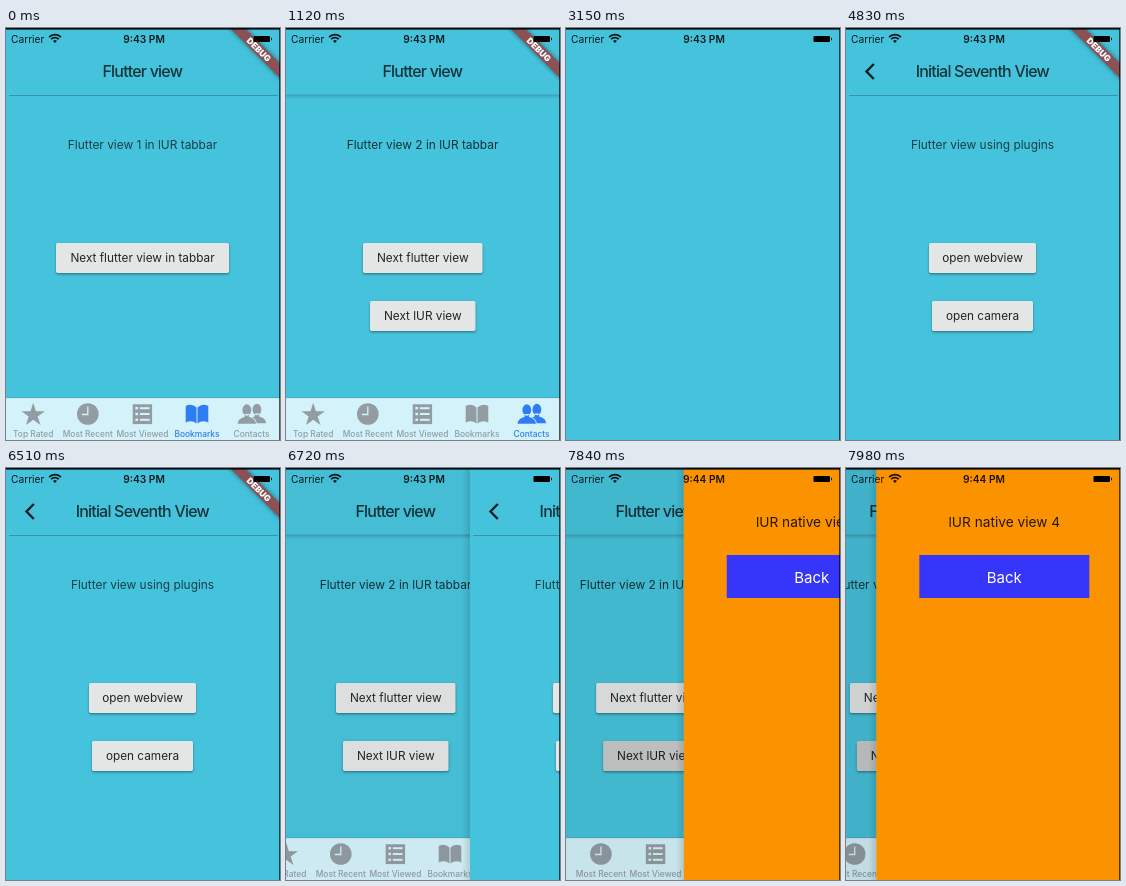
An HTML page with a canvas for the animation above (8 s loop, 274 by 412 pixels).

```html
<!DOCTYPE html>
<html lang="en">
<head>
<meta charset="utf-8">
<title>Tab bar navigation</title>
<style>
html, body { margin: 0; width: 100%; height: 100%; overflow: hidden; background: #46c3dc; }
canvas { display: block; width: 274px; height: 412px; }
</style>
</head>
<body>
<canvas id="stage"></canvas>
<script>
const W = 274, H = 412, LOOP = 8000, STEP = 70;
const CYAN = '#46c3dc', GREY = '#929ca2', BLUE = '#2f7df5', BAR = '#d4f2fa';
const canvas = document.getElementById('stage');
const ctx = canvas.getContext('2d');
const dpr = window.devicePixelRatio || 1;
canvas.width = W * dpr;
canvas.height = H * dpr;

const clamp = v => Math.max(0, Math.min(1, v));

// Critically damped spring used by the navigation controller.
function spring(t, start, length = 530) {
  const x = (t - start) * 0.0132;
  if (x <= 0) return 0;
  return t - start >= length ? 1 : 1 - (1 + x) * Math.exp(-x);
}

function rect(x, y, w, h, color) {
  ctx.fillStyle = color;
  ctx.fillRect(x, y, w, h);
}

function disc(x, y, r, color) {
  ctx.fillStyle = color;
  ctx.beginPath();
  ctx.arc(x, y, r, 0, Math.PI * 2);
  ctx.fill();
}

function line(points, width, color, cap = 'butt') {
  ctx.strokeStyle = color;
  ctx.lineWidth = width;
  ctx.lineCap = cap;
  ctx.beginPath();
  points.forEach(([x, y], i) => i ? ctx.lineTo(x, y) : ctx.moveTo(x, y));
  ctx.stroke();
}

function text(str, x, y, size, color, { weight = 400, align = 'center', spacing = 0 } = {}) {
  ctx.font = `${weight} ${size}px Inter, "Open Sans", sans-serif`;
  ctx.letterSpacing = spacing + 'px';
  ctx.textAlign = align;
  ctx.fillStyle = color;
  ctx.fillText(str, x, y);
  ctx.letterSpacing = '0px';
}

function at(x, y, draw) {
  ctx.save();
  ctx.translate(x, y);
  draw();
  ctx.restore();
}

function button(label, x, y, w, press = 0) {
  const h = 30;
  ctx.save();
  ctx.shadowColor = 'rgba(0,0,0,.4)';
  ctx.shadowBlur = 2.5 * dpr;
  ctx.shadowOffsetY = 1.2 * dpr;
  ctx.fillStyle = '#e4e6e6';
  ctx.beginPath();
  ctx.roundRect(x, y, w, h, 1.7);
  ctx.fill();
  ctx.restore();
  if (press > 0) {
    ctx.save();
    ctx.beginPath();
    ctx.roundRect(x, y, w, h, 1.7);
    ctx.clip();
    rect(x, y, w, h, 'rgba(0,0,0,.05)');
    disc(x + w / 2, y + h / 2, 8 + press * w * 0.55, 'rgba(0,0,0,.07)');
    ctx.restore();
  }
  text(label, x + w / 2, y + 19, 11.8, 'rgba(0,0,0,.85)');
}

function banner() {
  at(W - 0.5, 1, () => {
    ctx.rotate(Math.PI / 4);
    ctx.shadowColor = 'rgba(0,0,0,.5)';
    ctx.shadowBlur = 5 * dpr;
    rect(-36, 24, 72, 10.3, '#8c5157');
    ctx.shadowColor = 'transparent';
    text('DEBUG', 0, 32.3, 8.6, '#fff', { weight: 900 });
  });
}

function header(title, soft) {
  text(title, 136.3, 49, 16, 'rgba(0,0,0,.74)', { weight: 500, spacing: -0.8 });
  if (soft) {
    const g = ctx.createLinearGradient(0, 66, 0, 71);
    g.addColorStop(0, 'rgba(0,0,0,.2)');
    g.addColorStop(1, 'rgba(0,0,0,0)');
    rect(0, 66.5, W, 4.5, g);
  } else {
    rect(3, 67, 269, 1, 'rgba(0,0,0,.24)');
  }
}

const body = (str, dark) => text(str, 136.5, 121, 11.9, `rgba(0,0,0,${dark})`);

const icons = [
  c => {
    ctx.fillStyle = c;
    ctx.beginPath();
    for (let i = 0; i < 10; i++) {
      const r = i % 2 ? 4.7 : 12.3, a = i * Math.PI / 5 - Math.PI / 2;
      ctx.lineTo(r * Math.cos(a), 1 + r * Math.sin(a));
    }
    ctx.fill();
  },
  c => {
    disc(0, 0, 10.8, c);
    line([[0, -7.5], [0, 0.5], [-6, 0.5]], 1.3, BAR);
  },
  c => {
    rect(-9.7, -9.7, 19.4, 19.8, c);
    for (const y of [-5.8, 0, 5.8]) {
      rect(-7, y - 1.2, 2.6, 2.4, BAR);
      rect(-2.6, y - 1, 9.8, 2, BAR);
    }
  },
  c => {
    ctx.fillStyle = c;
    for (const s of [-1, 1]) {
      ctx.beginPath();
      ctx.moveTo(s * 0.5, -6.5);
      ctx.quadraticCurveTo(s * 5, -11, s * 11.3, -8);
      ctx.lineTo(s * 11.3, 8.5);
      ctx.quadraticCurveTo(s * 5, 5.8, s * 0.5, 9.5);
      ctx.fill();
    }
  },
  c => {
    person(5.3, -0.5, c);
    person(-4.8, 0, c);
  }
];

function person(x, y, c) {
  at(x, y, () => {
    ctx.beginPath();
    ctx.ellipse(0, -4, 4.4, 5.8, 0, 0, Math.PI * 2);
    ctx.moveTo(-2.2, 0);
    ctx.lineTo(-2.2, 3);
    ctx.quadraticCurveTo(-9, 4.6, -9.2, 9.8);
    ctx.lineTo(9.2, 9.8);
    ctx.quadraticCurveTo(9, 4.6, 2.2, 3);
    ctx.lineTo(2.2, 0);
    ctx.closePath();
    ctx.strokeStyle = BAR;
    ctx.lineWidth = 1.6;
    ctx.stroke();
    ctx.fillStyle = c;
    ctx.fill();
  });
}

const TABS = ['Top Rated', 'Most Recent', 'Most Viewed', 'Bookmarks', 'Contacts'];

function tabBar(selected) {
  rect(0, 370, W, 42, BAR);
  rect(0, 369.6, W, 0.6, 'rgba(0,0,0,.22)');
  TABS.forEach((label, i) => {
    const x = 27.2 + i * 54.6, c = i === selected ? BLUE : GREY;
    at(x, 386, () => icons[i](c));
    text(label, x, 409, 8.4, c, { weight: 500 });
  });
}

function firstTab() {
  rect(0, 0, W, H, CYAN);
  header('Flutter view', false);
  body('Flutter view 1 in lUR tabbar', 0.68);
  button('Next flutter view in tabbar', 50, 215, 173);
  banner();
  tabBar(3);
}

function secondTab(t) {
  rect(0, 0, W, H, CYAN);
  ctx.globalAlpha = clamp((t - 630) / 280);
  if (ctx.globalAlpha > 0) {
    header('Flutter view', true);
    body('Flutter view 2 in lUR tabbar', 0.75);
    const tap = start => t < start + 700 ? clamp((t - start + 70) / 350) : 0;
    button('Next flutter view', 77, 215, 119.5, tap(2380));
    button('Next lUR view', 84, 273, 105.5, tap(7350));
    banner();
  }
  ctx.globalAlpha = 1;
  tabBar(4);
}

function edgeShadow() {
  const g = ctx.createLinearGradient(-8, 0, 0, 0);
  g.addColorStop(0, 'rgba(0,0,0,0)');
  g.addColorStop(1, 'rgba(0,0,0,.12)');
  rect(-8, 0, 8, H, g);
}

function pluginView(t) {
  rect(0, 0, W, H, CYAN);
  const p = spring(t, 3640, 700);
  if (p === 0) return;
  at((1 - p) * W, 0, () => {
    if (p < 1) edgeShadow();
    line([[27.8, 36], [20.5, 43.5], [27.8, 51]], 2.4, 'rgba(0,0,0,.85)');
    header('Initial Seventh View', false);
    body('Flutter view using plugins', 0.68);
    button('open webview', 83, 215, 107);
    button('open camera', 86, 273, 101);
  });
  banner();
}

function nativeView() {
  rect(0, 0, W, H, '#fb9300');
  text('lUR native view 4', 128, 59, 13.7, 'rgba(0,0,0,.85)');
  rect(43, 87, 170, 43, '#3636fa');
  text('Back', 128, 114.5, 15, '#fff');
}

// Slides one view over another; the lower one lags and dims.
function stack(p, lower, upper) {
  if (p < 1) {
    at(-p * W * 0.3, 0, lower);
    rect(0, 0, W, H, `rgba(0,0,0,${0.1 * p})`);
  }
  if (p > 0) at((1 - p) * W, 0, () => {
    if (p < 1) edgeShadow();
    upper();
  });
}

function statusBar(t) {
  const ink = 'rgba(0,0,0,.88)';
  text('Carrier', 5, 14.5, 10.2, ink, { align: 'left' });
  for (const r of [8.2, 5.2]) {
    ctx.strokeStyle = ink;
    ctx.lineWidth = 1.7;
    ctx.beginPath();
    ctx.arc(49, 14.8, r, -Math.PI * 0.76, -Math.PI * 0.24);
    ctx.stroke();
  }
  ctx.fillStyle = ink;
  ctx.beginPath();
  ctx.moveTo(49, 15);
  ctx.arc(49, 14.8, 2.7, -Math.PI * 0.76, -Math.PI * 0.24);
  ctx.fill();
  text(t < 7350 ? '9:43 PM' : '9:44 PM', 138, 14.5, 10.2, ink, { weight: 600 });
  ctx.fillStyle = '#000';
  ctx.beginPath();
  ctx.roundRect(247.5, 8, 16.5, 6, 1);
  ctx.fill();
  rect(265, 9.8, 1, 2.4, ink);
}

function draw(t) {
  ctx.setTransform(dpr, 0, 0, dpr, 0, 0);
  const tab = () => secondTab(t);
  if (t < 70) firstTab();
  else if (t < 7200) {
    stack(spring(t, 2600) * (1 - spring(t, 6545)), tab, () => pluginView(t));
  } else stack(spring(t, 7695), tab, nativeView);
  statusBar(t);
  rect(0, 0, W, 1.6, '#05090a');
  rect(W - 1, 0, 1, H, 'rgba(0,0,0,.65)');
}

const begin = performance.now();
function frame() {
  const t = (performance.now() - begin) % LOOP;
  draw(Math.floor(t / STEP) * STEP);
  requestAnimationFrame(frame);
}
frame();
</script>
</body>
</html>
```
